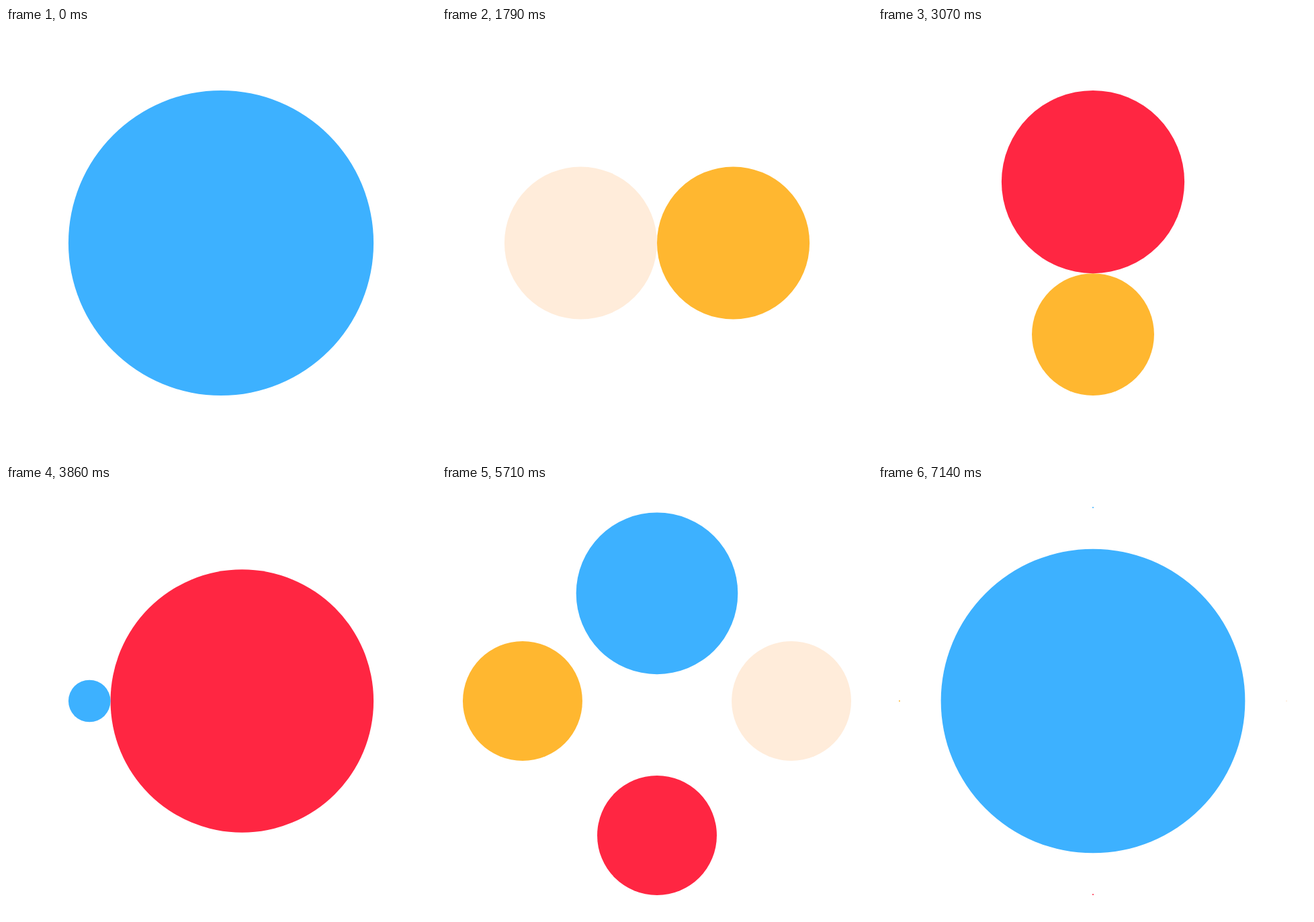
An HTML page for the animation above (7210 ms loop, 640 px wide and 640 px high).

```html
<!DOCTYPE html>
<html lang="en">
<head>
<meta charset="utf-8">
<title>Circles</title>
<style>
  html, body { margin: 0; width: 100%; height: 100%; overflow: hidden; background: #fff; }
  svg { display: block; width: 100%; height: 100%; }
</style>
</head>
<body>
<svg id="stage" viewBox="-31 -31 62 62"></svg>
<script>
const BLUE = '#3db1ff', CREAM = '#ffecda', ORANGE = '#ffb730', RED = '#ff2642';
const COLORS = [BLUE, CREAM, ORANGE, RED, BLUE];
const DIRS = [[0, 1], [1, 0], [0, -1], [-1, 0]];               // side the next circle grows from
const CORNERS = [[BLUE, 0, -1], [CREAM, 1, 0], [RED, 0, 1], [ORANGE, -1, 0]];
const BIG = 22, SMALL = 10, EDGE = 28, PX = 62 / 640;
const LOOP = 7210, OUT_FPS = 14, FPS = 25, PHASE = 30;

const stage = document.getElementById('stage');
const circles = Array.from({ length: 5 }, () => {
  const c = document.createElementNS('http://www.w3.org/2000/svg', 'circle');
  return stage.appendChild(c);
});

const smooth = x => x * x * (3 - 2 * x);

// Time to whole animation steps, as shown at the output rate
function stepAt(ms) {
  const shown = Math.floor((Math.floor(ms / 10) * 10 + 5) * OUT_FPS / 1000);
  return Math.ceil(shown * FPS / OUT_FPS);
}

function put(i, fill, r, dx = 0, dy = 0, dist = 0) {
  const c = circles[i];
  c.setAttribute('fill', fill);
  c.setAttribute('r', r);
  c.setAttribute('cx', dx * dist);
  c.setAttribute('cy', dy * dist);
}

// Small circle resting against the outer edge
function putCorner(i, p) {
  const [fill, dx, dy] = CORNERS[i];
  const r = p > 0 ? Math.max(PX, SMALL * p) : 0;
  put(i, fill, r, dx, dy, EDGE - r);
}

function handOver(phase, e) {
  const [dx, dy] = DIRS[phase];
  put(0, COLORS[phase], BIG * (1 - e), -dx, -dy, BIG * e);
  put(1, COLORS[phase + 1], BIG * e, dx, dy, BIG * (1 - e));
}

function spread(e) {
  put(0, BLUE, BIG + (SMALL - BIG) * e, 0, -1, (EDGE - SMALL) * e);
  for (let i = 1; i < 4; i++) putCorner(i, e);
}

function regrow(e) {
  for (let i = 0; i < 4; i++) putCorner(i, 1 - e);
  put(4, BLUE, BIG * e);
}

function draw(ms) {
  const step = stepAt(ms % LOOP);
  const phase = Math.floor(step / PHASE);
  const e = smooth(step % PHASE / PHASE);
  circles.forEach(c => c.setAttribute('r', 0));
  if (phase < 4) handOver(phase, e);
  else if (phase === 4) spread(e);
  else regrow(e);
}

const start = performance.now();
function tick() {
  draw(performance.now() - start);
  requestAnimationFrame(tick);
}
tick();
</script>
</body>
</html>
```
